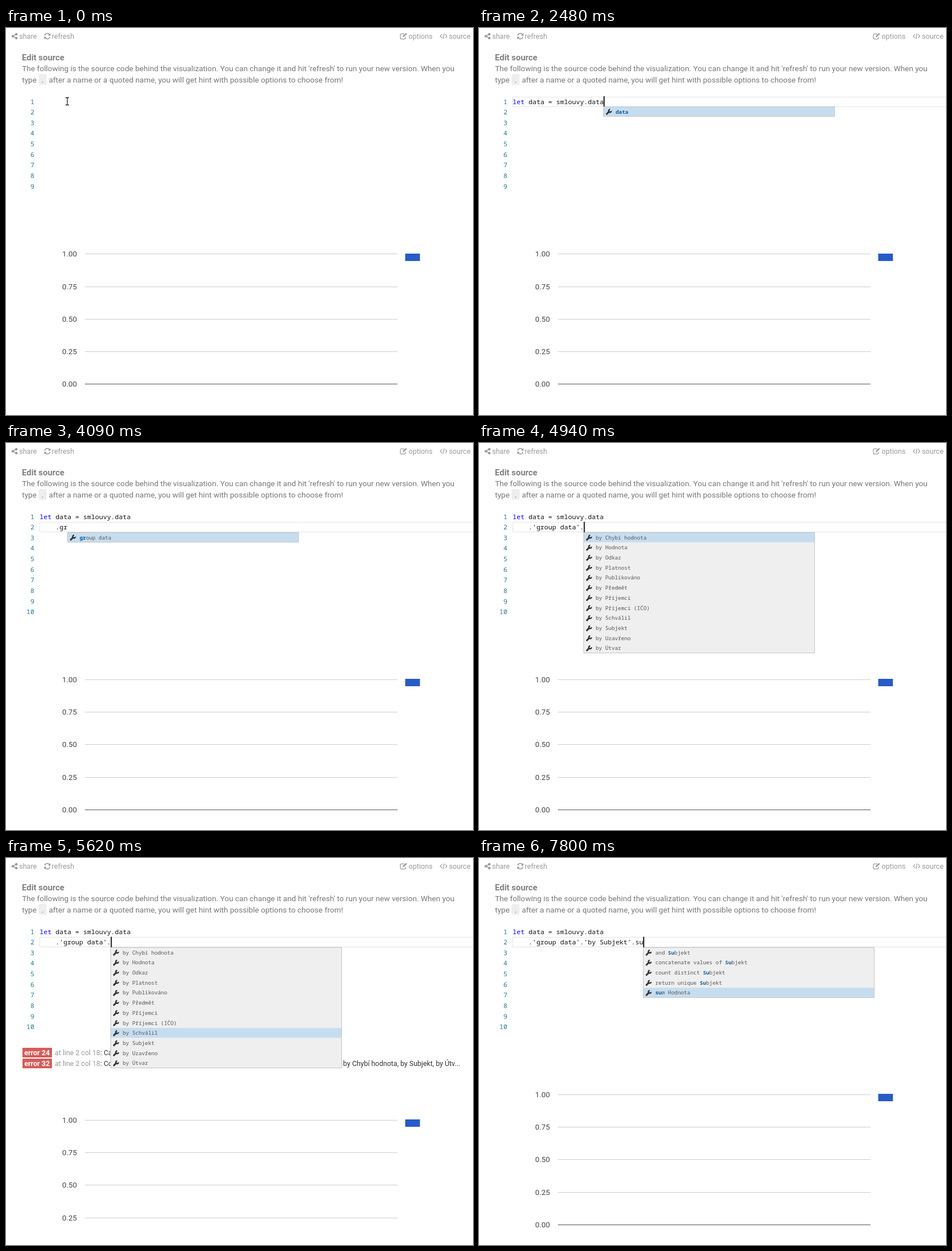
An HTML page for the animation above (8000 ms loop, 823 px wide and 681 px high).

```html
<!DOCTYPE html>
<html lang="en">
<head>
<meta charset="utf-8">
<title>Code editor with completion</title>
<style>
  html, body { margin: 0; width: 100%; height: 100%; overflow: hidden; background: #fff; }
  svg { display: block; }
  text { white-space: pre; font-family: Roboto, sans-serif; font-size: 13.65px; fill: #777; }
  .link { font-size: 12.6px; fill: #999; }
  .title { font-size: 14.9px; font-weight: 700; fill: #808080; }
  .icon { fill: none; stroke: #999; stroke-width: 1.5; }
  .code { font-family: "Noto Sans Mono", monospace; font-size: 11.633px; fill: #111; }
  .number { fill: #237893; text-anchor: end; }
  .keyword { fill: #00f; }
  .item { font-family: "Noto Sans Mono", monospace; font-size: 9.33px; fill: #555; }
  .match { fill: #0a5a9c; font-weight: 600; }
  .axis { font-size: 13.3px; fill: #444; text-anchor: end; }
  .error { font-size: 12.42px; fill: #333; }
  .badge { font-size: 12.6px; font-weight: 700; fill: #fff; }
  .place { fill: #999; }
</style>
</head>
<body>
<svg width="823" height="681" viewBox="0 0 823 681">
  <defs>
    <g id="wrench" fill="none" stroke="#333">
      <path d="M-3.6,3.6L.4,-.4" stroke-width="3" stroke-linecap="round"/>
      <path d="M2.2,-4.2A2.4,2.4 0 1 0 4.4,-1.8" stroke-width="2.3"/>
    </g>
  </defs>
  <g class="icon">
    <path d="M18,11L12,14.4L18,17.8"/>
    <g fill="#999" stroke="none">
      <circle cx="18.2" cy="11" r="2.2"/><circle cx="12" cy="14.4" r="2.2"/><circle cx="18.2" cy="17.8" r="2.2"/>
      <path d="M78.4,9v4.4h-4.4zM67.2,20v-4.4h4.4z"/>
    </g>
    <path d="M68.2,13.2A4.7,4.7 0 0 1 76.6,11.6M77.4,15.6A4.7,4.7 0 0 1 69,17.3"/>
    <path d="M702,10.3H697Q695,10.3 695,12.3V17.3Q695,19.3 697,19.3H702Q704,19.3 704,17.3V15.5" stroke-width="1.2"/>
    <path d="M699.6,15.4L705.8,9.6" stroke-width="2.6"/>
    <path d="M768.4,11.2L765.4,14.4L768.4,17.6M774,11.2L777,14.4L774,17.6M772.2,9.6L770.2,19.2" stroke-width="1.2"/>
  </g>
  <text class="link" x="23.2" y="18.6">share</text>
  <text class="link" x="80.6" y="18.6">refresh</text>
  <text class="link" x="709.6" y="18.6">options</text>
  <text class="link" x="780.6" y="18.6">source</text>
  <text class="title" x="28" y="57.4">Edit source</text>
  <text x="28.2" y="75.6">The following is the source code behind the visualization. You can change it and hit 'refresh' to run your new version. When you</text>
  <text x="28.2" y="95.6">type</text>
  <rect x="57.5" y="81" width="14" height="19" rx="3" fill="#eee"/>
  <text class="code" x="61" y="95.6" style="fill:#c7254e">.</text>
  <text x="75.4" y="95.6">after a name or a quoted name, you will get hint with possible options to choose from!</text>
  <g id="scene"></g>
</svg>
<script>
const LOOP = 8000, LEFT = 59.3, CHAR = 6.98, LINE = 18.63, ROW = 17.7;
const scene = document.getElementById("scene");

const columns = ["Chybí hodnota", "Hodnota", "Odkaz", "Platnost", "Publikováno", "Předmět",
  "Příjemci", "Příjemci (IČO)", "Schválil", "Subjekt", "Uzavřeno", "Útvar"];
const withPrefix = prefix => columns.map(name => prefix + name);
const lists = {
  source: ["data"],
  transform: ["drop columns", "filter data", "get series", "group data", "paging", "sort data"],
  key: withPrefix("by "),
  aggregate: [...withPrefix("and "), ...withPrefix("concatenate values of "),
    ...withPrefix("count distinct "), ...withPrefix("return unique "), "sum Hodnota"]
};

// Timeline: each event overrides part of the state.
const events = [];
const at = (time, change) => events.push({ time, change });

function type(from, to, steps, prefix, text, extra) {
  for (let i = 0; i < steps; i++) {
    const typed = text.slice(0, Math.ceil((i + 1) * text.length / steps));
    at(from + (to - from) * i / (steps - 1), { first: prefix + typed, caret: true, ...extra });
  }
}

const first = "let data = smlouvy.data";
const grouped = "    .'group data'", keyed = grouped + ".'by Subjekt'";

at(0, { first: "", second: null, caret: false, active: false, errors: false,
  list: null, selected: 0, mouse: ["beam", 108, 129] });
at(260, { mouse: ["beam", 82, 131] });
at(340, { mouse: ["arrow", 30, 133] });
at(430, { mouse: ["beam", 66, 130], active: true, caret: true });
at(510, { mouse: null });
at(710, { caret: false });
type(910, 1590, 10, "", first.slice(0, 11));
type(1790, 2100, 5, first.slice(0, 11), "smlouvy");
type(2300, 2480, 4, first.slice(0, 18), ".data", { list: "source" });
at(2680, { caret: false });
at(2740, { list: null });
at(2940, { second: "", caret: true });
at(3060, { second: " " });
at(3130, { second: "  " });
at(3390, { second: "   " });
at(3510, { second: "    " });
at(3640, { second: "    ." });
at(3700, { list: "transform" });
at(3760, { second: "    .g" });
at(3890, { second: "    .gr" });
at(4090, { caret: false });
at(4350, { second: grouped, list: null, caret: true });
at(4410, { second: grouped + ".", list: "key" });
at(4740, { caret: false });
at(4940, { caret: true });
at(5000, { selected: 1 });
at(5200, { caret: false, errors: true });
for (let i = 2; i < 10; i++) at(5140 + 60 * i, { selected: i, caret: i >= 5 });
at(5740, { caret: false });
at(5870, { caret: true });
at(6070, { second: keyed, list: null, selected: 0 });
at(6330, { caret: false });
at(6590, { caret: true });
at(6850, { caret: false });
at(7110, { caret: true, errors: false });
at(7240, { second: keyed + ".", list: "aggregate" });
at(7480, { caret: false });
at(7740, { second: keyed + ".s", caret: true });
at(7800, { second: keyed + ".su", selected: 4 });

const text = (x, y, cls, content) => `<text class="${cls}" x="${x}" y="${y}">${content}</text>`;
const rect = (x, y, w, h, fill, more = "") =>
  `<rect x="${x}" y="${y}" width="${w}" height="${h}" fill="${fill}" ${more}/>`;

function drawEditor(s, row, column) {
  const lineCount = s.second === null ? 9 : 10;
  let out = "";
  if (s.active) out += rect(59.5, row ? 139.5 : 121.5, 800, 17, "none", 'stroke="#e4e4e4"');
  for (let i = 0; i < lineCount; i++) out += text(50, 133.6 + LINE * i, "code number", i + 1);
  out += text(LEFT, 133.6, "code", s.first.replace(/^let?|^l/, '<tspan class="keyword">$&</tspan>'));
  if (row) out += text(LEFT, 133.6 + LINE, "code", s.second);
  if (s.caret) out += rect(LEFT + CHAR * column - .3, 120 + LINE * row, 1.8, 18.6, "#000");
  return out;
}

function drawErrors() {
  const messages = [
    [24, "Call chain should not end with ."],
    [32, "Could not find property '' in the list 'by Uzavřeno, by Publikováno, by Hodnota, by Chybí hodnota, by Subjekt, by Útv..."]
  ];
  return messages.map(([code, message], i) => {
    const y = 347.4 + LINE * i;
    return rect(29, Math.round(y - 13), 52, 17, "#d75c58") + text(32.2, y, "badge", "error " + code) +
      text(86, y, "error", `<tspan class="place">at line 2 col 18</tspan>: ${message}`);
  }).join("");
}

function drawChart(shift) {
  let out = rect(703.5, Math.round(396.8 + shift), 26, 13, "#265bc8");
  for (let i = 0; i < 5; i++) {
    const y = Math.round(397.3 + 57.2 * i + shift);
    out += rect(139, y, 551, 1, i < 4 ? "#ccc" : "#555") +
      text(124.9, y + 5.2, "axis", (1 - i / 4).toFixed(2));
  }
  return out;
}

function drawPopup(s, row, column) {
  const query = (row ? s.second : s.first).split(".").pop();
  const items = lists[s.list].filter(name => name.toLowerCase().includes(query)).slice(0, 12);
  const x = Math.floor(LEFT + CHAR * column) + .5, y = Math.floor(138.8 + LINE * row) + .5;
  const width = 407, height = Math.round(ROW * items.length - .6);
  let out = rect(x, y, width, height, "#efefef");
  items.forEach((name, i) => {
    const top = y + ROW * i;
    const start = name.toLowerCase().indexOf(query), end = start + query.length;
    if (i === s.selected) out += rect(x, top, width, ROW - .5, "#c6ddf0");
    out += `<use href="#wrench" x="${x + 9.3}" y="${top + 9.2}"/>` + text(x + 21.2, top + 12.1, "item",
      query ? `${name.slice(0, start)}<tspan class="match">${name.slice(start, end)}</tspan>${name.slice(end)}` : name);
  });
  return out + rect(x, y, width, height, "none", 'stroke="#c4c4c4"');
}

function drawMouse([kind, x, y]) {
  const shape = kind === "beam"
    ? '<path d="M-3,-6.5H-1L0,-5.5L1,-6.5H3M0,-5.5V5.5M-3,6.5H-1L0,5.5L1,6.5H3" fill="none" stroke="#222" stroke-width="1.3"/>'
    : '<path d="M0,0V16L4,12.5L6.5,18.5L9,17.5L6.5,11.5H11.5Z" fill="#fff" stroke="#000"/>';
  return `<g transform="translate(${x} ${y})">${shape}</g>`;
}

function draw(s) {
  const row = s.second === null ? 0 : 1;
  const column = (row ? s.second : s.first).length;
  scene.innerHTML = drawEditor(s, row, column) +
    drawChart(LINE * row + (s.errors ? 45 : 0)) +
    (s.errors ? drawErrors() : "") +
    (s.list ? drawPopup(s, row, column) : "") +
    (s.mouse ? drawMouse(s.mouse) : "");
}

let shown = 0;
function frame() {
  const time = performance.now() % LOOP;
  const past = events.filter(e => e.time <= time);
  if (past.length !== shown) {
    shown = past.length;
    draw(Object.assign({}, ...past.map(e => e.change)));
  }
  requestAnimationFrame(frame);
}
frame();
</script>
</body>
</html>
```
